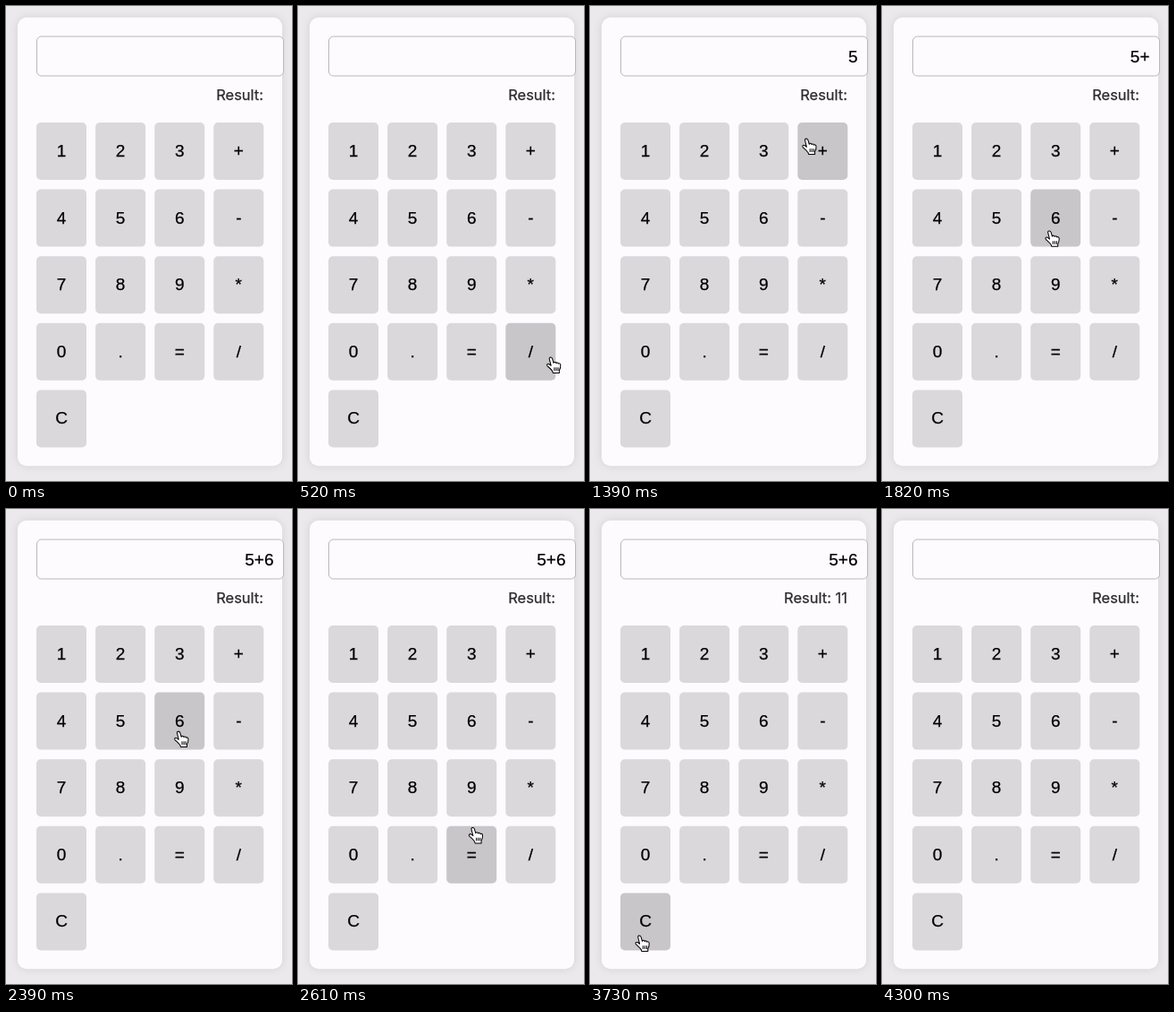
Animation of 320 by 530 pixels, one loop 5360 ms. Source, as an HTML page:

```html
<!DOCTYPE html>
<html lang="en">
<head>
<meta charset="utf-8">
<title>Calculator</title>
<style>
  html, body { margin: 0; width: 100%; height: 100%; overflow: hidden; background: #ebe9ec; }
  svg { display: block; width: 320px; height: 530px; }
  text { font: 19px "Liberation Sans", Arial, sans-serif; fill: #000; stroke: #000; stroke-width: .25px; }
  .key { fill: #dad8db; }
  .key.hover { fill: #c8c6c9; }
  .label { text-anchor: middle; }
  .end { text-anchor: end; }
  #result { font: 16.5px Inter, sans-serif; fill: #2b2a2c; stroke: #2b2a2c; }
  #card { fill: #fdfbfe; filter: drop-shadow(0 0 5px rgba(0, 0, 0, .1)); }
</style>
</head>
<body>
<svg viewBox="0 0 320 530">
  <rect id="card" x="13" y="12.7" width="296" height="500.6" rx="10"/>
  <rect x="34.5" y="34" width="276" height="44" rx="5" fill="#fdfbfe" stroke="#b9b7ba"/>
  <text id="display" class="end" x="299.5" y="62.5"></text>
  <text id="result" class="end" x="288" y="105.4"></text>
  <g id="keys"></g>
  <g id="pointer">
    <circle id="ring" r="31.8" fill="none" stroke="#000" stroke-width="1.5"/>
    <g transform="translate(-.6 -.4) scale(.94)" stroke="#000" stroke-width="1.1" stroke-linejoin="round">
      <path fill="#fff" d="M-1.8 1.4C-2.2-.9 1-1.2 1.7.8L3.3 6C3.8 4.6 5.8 4.7 6.2 6.3
        C6.9 5.2 8.6 5.5 8.9 7C9.7 6.2 11.3 6.5 11.5 8.4C11.8 11 11.2 12.8 10 15V18H2.6
        L2 16C.4 13.4-2 11.6-4 9.8C-5.8 7.8-3.4 6.2-1.8 7.6L.2 9.2Z"/>
      <path fill="none" d="M4.2 11.4v3.8M6.4 11.4v3.8M8.6 11.4v3.8"/>
    </g>
  </g>
</svg>
<script>
const LOOP = 5360, ENTER = 420, LEAVE = 4300;
const TRAVEL = 380, RING = 95, REACTION = 60;
const KEY_W = 56, KEY_H = 64;
const $ = id => document.getElementById(id);

// Each move glides to (x, y), then presses the key there
const entry = { x: 315, y: 429 };
const moves = [
  { start: ENTER, x: 134.5, y: 222.5, press: 820, display: "5" },
  { start: 1060, x: 248, y: 145.5, press: 1550, display: "5+" },
  { start: 1605, x: 193.5, y: 242, press: 2150, display: "5+6", overshoot: .9 },
  { start: 2340, x: 197, y: 385, press: 2790, display: "5+6", result: "11" },
  { start: 3270, x: 56, y: 477, press: 3880, display: "", overshoot: .5 },
  { start: 4200, x: 1064, y: 824, press: Infinity }
];

const keys = [..."123+456-789*0.=/C"].map((label, i) => {
  const x = 34 + (i % 4) * 66.1, y = 130 + Math.floor(i / 4) * 74.6;
  const add = (tag, attrs) => {
    const el = document.createElementNS("http://www.w3.org/2000/svg", tag);
    for (const name in attrs) el.setAttribute(name, attrs[name]);
    return $("keys").appendChild(el);
  };
  const rect = add("rect", { class: "key", x, y, width: KEY_W, height: KEY_H, rx: 5 });
  add("text", { class: "label", x: x + KEY_W / 2, y: y + 37.9 }).textContent = label;
  return { x, y, rect };
});

function pointerAt(t) {
  const i = Math.max(0, moves.findLastIndex(move => move.start <= t));
  const from = moves[i - 1] ?? entry, { start, x, y, overshoot = 0 } = moves[i];
  const u = Math.min(1, Math.max(0, (t - start) / TRAVEL));
  const ease = u * u * (3 - 2 * u) + overshoot * u * Math.sin(Math.PI * u);
  return [from.x + (x - from.x) * ease, from.y + (y - from.y) * ease];
}

function draw(t) {
  const visible = t >= ENTER && t < LEAVE;
  const [px, py] = pointerAt(t);
  const show = (id, on) => $(id).setAttribute("visibility", on ? "inherit" : "hidden");
  show("pointer", visible);
  show("ring", moves.some(({ press }) => t >= press && t < press + RING));
  $("pointer").setAttribute("transform", `translate(${px} ${py})`);

  const { display = "", result = "" } = moves.findLast(move => move.press + REACTION <= t) ?? {};
  $("display").textContent = display;
  $("result").textContent = `Result: ${result}`.trim();

  for (const { x, y, rect } of keys) {
    const over = px >= x && px < x + KEY_W && py >= y && py < y + KEY_H;
    rect.classList.toggle("hover", visible && over);
  }
}

function tick() {
  draw(performance.now() % LOOP);
  requestAnimationFrame(tick);
}
tick();
</script>
</body>
</html>
```
